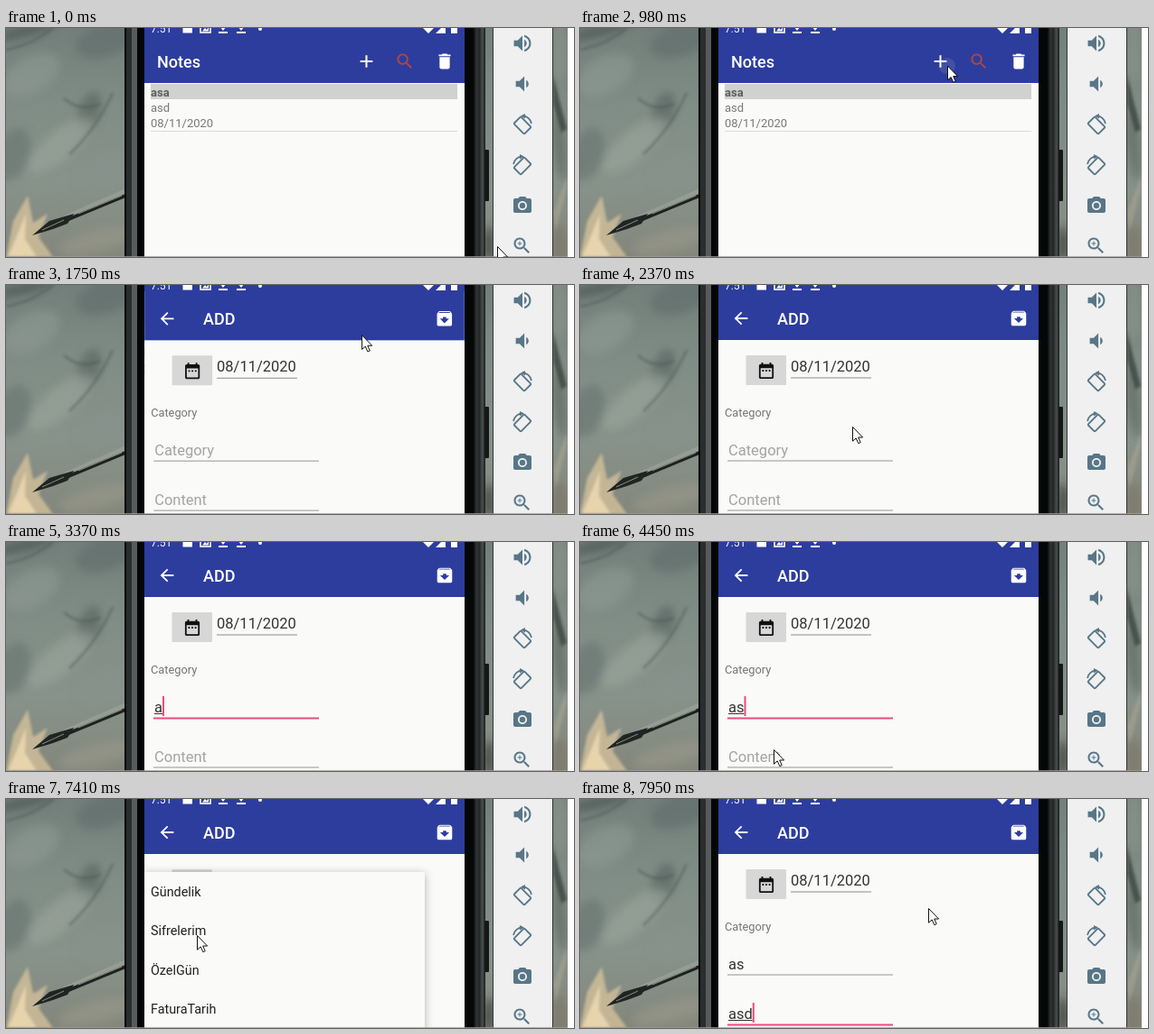
Animation of 628x254 px, one loop 8000 ms. Source, as an HTML page:

```html
<!DOCTYPE html>
<html lang="en">
<head>
<meta charset="utf-8">
<title>Notes app</title>
<style>
  html, body { margin: 0; width: 100%; height: 100%; overflow: hidden; background: #fff; }
  svg { display: block; width: 628px; height: 254px; }
  text { font-family: Roboto, Arial, sans-serif; white-space: pre; }
</style>
</head>
<body>
<svg id="stage" viewBox="0 0 628 254" xmlns="http://www.w3.org/2000/svg"></svg>
<script>
const LOOP = 8000;
const BLUE = '#2d3d9e', PAPER = '#fafaf8', PINK = '#ee4a82', SLATE = '#587688';

const ICONS = {
  volumeUp: 'M3 9v6h4l5 5V4L7 9H3zm13.5 3c0-1.77-1.02-3.29-2.5-4.03v8.05c1.48-.73 2.5-2.25 2.5-4.02zM14 3.23v2.06c2.89.86 5 3.54 5 6.71s-2.11 5.85-5 6.71v2.06c4.01-.91 7-4.49 7-8.77s-2.99-7.86-7-8.77z',
  volumeDown: 'M18.5 12c0-1.77-1.02-3.29-2.5-4.03v8.05c1.48-.73 2.5-2.25 2.5-4.02zM5 9v6h4l5 5V4L9 9H5z',
  camera: 'M9 2L7.17 4H4c-1.1 0-2 .9-2 2v12c0 1.1.9 2 2 2h16c1.1 0 2-.9 2-2V6c0-1.1-.9-2-2-2h-3.17L15 2H9zm3 15c-2.76 0-5-2.24-5-5s2.24-5 5-5 5 2.24 5 5-2.24 5-5 5zM12 8.8a3.2 3.2 0 1 0 0 6.4a3.2 3.2 0 1 0 0-6.4z',
  search: 'M15.5 14h-.79l-.28-.27C15.41 12.59 16 11.11 16 9.5 16 5.91 13.09 3 9.5 3S3 5.91 3 9.5 5.91 16 9.5 16c1.61 0 3.09-.59 4.23-1.57l.27.28v.79l5 4.99L20.49 19l-4.99-5zm-6 0C7.01 14 5 11.99 5 9.5S7.01 5 9.5 5 14 7.01 14 9.5 11.99 14 9.5 14z',
  smallPlus: 'M12 10h-2v2H9v-2H7V9h2V7h1v2h2z',
  plus: 'M19 13h-6v6h-2v-6H5v-2h6V5h2v6h6v2z',
  trash: 'M6 19c0 1.1.9 2 2 2h8c1.1 0 2-.9 2-2V7H6v12zM19 4h-3.5l-1-1h-5l-1 1H5v2h14V4z',
  archive: 'M20.54 5.23l-1.39-1.68C18.88 3.21 18.47 3 18 3H6c-.47 0-.88.21-1.16.55L3.46 5.23C3.17 5.57 3 6.02 3 6.5V19c0 1.1.9 2 2 2h14c1.1 0 2-.9 2-2V6.5c0-.48-.17-.93-.46-1.27zM12 17.5L6.5 12H10v-2h4v2h3.5L12 17.5zM5.12 5l.81-1h12l.94 1H5.12z',
  back: 'M20 11H7.83l5.59-5.59L12 4l-8 8 8 8 1.41-1.41L7.83 13H20v-2z',
  calendar: 'M9 11H7v2h2v-2zm4 0h-2v2h2v-2zm4 0h-2v2h2v-2zm2-7h-1V2h-2v2H8V2H6v2H5c-1.11 0-1.99.9-1.99 2L3 20c0 1.1.89 2 2 2h14c1.1 0 2-.9 2-2V6c0-1.1-.9-2-2-2zm0 16H5V9h14v11z',
};

// Markup helpers
const rect = (x, y, w, h, fill, more = '') =>
  `<rect x="${x}" y="${y}" width="${w}" height="${h}" fill="${fill}" ${more}/>`;
const text = (x, y, size, fill, str, more = '') =>
  `<text x="${x}" y="${y}" font-size="${size}" fill="${fill}" ${more}>${str}</text>`;
const path = (d, more) => `<path d="${d}" ${more}/>`;
const icon = (name, cx, cy, scale, fill) =>
  path(ICONS[name], `fill="${fill}" fill-rule="evenodd" transform="translate(${cx} ${cy}) scale(${scale}) translate(-12 -12)"`);
const blob = (cx, cy, rx, ry, fill, opacity, turn = 0) =>
  `<ellipse cx="${cx}" cy="${cy}" rx="${rx}" ry="${ry}" fill="${fill}" opacity="${opacity}" transform="rotate(${turn} ${cx} ${cy})"/>`;
const gradient = (id, vertical, colors) =>
  `<linearGradient id="${id}" x2="${vertical ? 0 : 1}" y2="${vertical ? 1 : 0}">${colors.map((c, i) =>
    `<stop offset="${i / (colors.length - 1)}" stop-color="${c}"/>`).join('')}</linearGradient>`;

const rotateIcon = (cy, flip) => `
  <g transform="translate(571 ${cy}) scale(${flip} 1)" fill="none" stroke="${SLATE}" stroke-width="1.9">
    <rect x="-5.5" y="-8.2" width="11" height="16.4" rx="1.2" transform="translate(0 1) rotate(-45)"/>
    <path d="M0 -9.6Q8 -9 10 -1" stroke-width="1.8"/>
    <path d="M-2 -9.6L3 -12V-6.5Z" fill="${SLATE}" stroke="none"/>
  </g>`;

const wallpaper = `
  ${rect(0, 0, 621, 254, 'url(#stone)')}
  <g filter="url(#soft)">
    ${blob(20, 4, 34, 6, '#4b5653', .7, -14)}
    ${blob(110, 14, 34, 18, '#606d69', .6, -18)}
    ${blob(28, 52, 34, 20, '#929d96', .5, -30)}
    ${blob(92, 92, 12, 22, '#56625e', .6, 20)}
    ${blob(60, 130, 44, 16, '#9ca69d', .6, -40)}
    ${blob(8, 140, 18, 30, '#66736e', .6, 18)}
    ${blob(105, 160, 28, 18, '#87938c', .6, -30)}
    ${blob(100, 236, 42, 12, '#9a988a', .6, -14)}
    ${blob(534, 110, 5, 70, '#7d8984', .7)}
    ${blob(534, 240, 5, 20, '#33393a', .8)}
    ${blob(612, 20, 9, 40, '#8a948b', .7)}
    ${blob(612, 130, 7, 40, '#626a63', .7, -6)}
    ${blob(612, 240, 9, 22, '#7d776a', .7)}
  </g>
  <g filter="url(#brush)">
    ${path('M0 254L8 214L24 186L30 216L46 206L36 232L52 254Z', 'fill="#d9c49c" opacity=".75"')}
    ${path('M2 254L14 226L22 206L21 234L34 254Z', 'fill="#f0dcb4" opacity=".8"')}
    ${path('M605 52L620 112L614 116L605 84Z', 'fill="#3b423f" opacity=".75"')}
    ${path('M605 205L620 165V178L608 225Z', 'fill="#aaa38f" opacity=".6"')}
    ${path('M0 24Q30 18 52 0M64 78Q82 94 104 84M70 140Q100 112 118 72', 'fill="none" stroke="#4a5552" stroke-width="2.5" opacity=".5"')}
  </g>
  ${path('M132 182L64 212', 'stroke="#a9aea3" stroke-width="7" opacity=".45"')}
  ${path('M132 186L62 215', 'stroke="#1d2120" stroke-width="4"')}
  ${path('M29 230L48 214L75 206L68 217L52 223Z', 'fill="#202423"')}
  ${path('M40 224L64 213M80 206L128 186', 'stroke="#8b8d82" stroke-width="1"')}
  ${rect(621, 0, 7, 254, '#fff')}`;

const phone = `
  ${rect(131, 0, 399, 254, '#050606')}
  ${rect(133, 0, 6, 254, '#2a2d2d')}
  ${rect(139, 0, 6, 254, '#575b5b')}
  ${rect(517, 0, 13, 254, 'url(#edgeRight)')}
  ${rect(529, 135, 5, 57, '#151717', 'rx="1"')}
  ${rect(538, 0, 1, 254, '#303535')}`;

const toolbar = `
  ${rect(539, 0, 65, 254, '#f0f0f0')}
  ${rect(604, 0, 1, 254, '#30302e')}
  ${icon('volumeUp', 571, 17, 1.05, SLATE)}
  ${icon('volumeDown', 571, 62, 1.05, SLATE)}
  ${rotateIcon(107, 1)}${rotateIcon(152, -1)}
  ${icon('camera', 571, 197, 1, SLATE)}
  ${icon('search', 570.5, 241.5, 1, SLATE)}${icon('smallPlus', 570.5, 241.5, 1, SLATE)}`;

const download = x => path(`M${x - 3.5} -3L${x} 1.5L${x + 3.5} -3M${x - 5} 5h10`, 'fill="none" stroke="#fff" stroke-width="1.8"');
const statusBar = `
  ${rect(153, 0, 354, 7, BLUE)}
  ${text(160, 5, 12, '#fff', '7:51')}
  ${rect(195.5, -5, 10.5, 10.5, '#fff')}
  ${rect(215, -5, 11, 10, 'none', 'stroke="#fff" stroke-width="1.6"')}
  ${path('M217 3.5L220 0L222 2L224 -1V3.5Z', 'fill="#fff"')}
  ${download(240)}${download(260)}
  <circle cx="281" cy="1" r="2" fill="#fff"/>
  ${path('M461 0H473L467 6ZM475 6L486 -5V6Z', 'fill="#fff"')}
  ${rect(492, -5, 7, 11, '#fff')}`;

const listScreen = `
  ${rect(153, 0, 354, 300, PAPER)}
  ${rect(153, 0, 354, 61, BLUE)}
  <circle id="ripple" fill="#fff" opacity=".1"/>
  ${text(167, 44, 18, '#fff', 'Notes', 'font-weight="500"')}
  ${icon('plus', 398.5, 37, .98, '#fff')}
  ${icon('search', 441, 37, .95, '#b2473f')}
  ${icon('trash', 485, 37, .94, '#fff')}
  ${rect(160, 62, 339, 17, '#d0d2d0')}
  ${text(160, 76, 13, '#5c5f5c', 'asa', 'font-weight="700"')}
  ${text(160, 93, 13, '#777a77', 'asd')}
  ${text(160, 110, 13, '#777a77', '08/11/2020')}
  ${rect(160, 114, 339, 1, '#dadbd9')}`;

const field = id => `
  <text id="${id}Text" x="164" font-size="16.5"></text>
  <rect id="${id}Line" x="163" width="183"/>
  <rect id="${id}Compose" x="164" height="1" fill="#333"/>
  <rect id="${id}Caret" width="2" height="22" fill="${PINK}"/>`;

const addScreen = `
  ${rect(153, 0, 354, 300, PAPER)}
  ${rect(153, -60, 354, 121, BLUE)}
  ${icon('back', 178, 37, .92, '#fff')}
  ${text(218, 44, 18, '#fff', 'ADD', 'font-weight="500"')}
  ${icon('archive', 485, 37, .92, '#fff')}
  ${rect(183.5, 78, 44.5, 33, '#d6d7d6', 'rx="1"')}
  ${icon('calendar', 206, 95, .9, '#111')}
  ${text(233, 96, 16.5, '#333', '08/11/2020')}
  ${rect(233, 102.5, 89, 1, '#8d8d8d')}
  ${text(160, 145.5, 12.8, '#747674', 'Category')}
  ${field('category')}${field('content')}`;

const popup = `
  <rect id="popupBox" height="220" fill="${PAPER}" filter="url(#shadow)"/>
  <rect id="itemPress" x="153" y="125" width="310" height="43" fill="#000"/>
  <g id="popupItems">${['Gündelik', 'Sifrelerim', 'ÖzelGün', 'FaturaTarih'].map((name, i) =>
    text(160, 108 + i * 43.3, 14.35, '#202020', name)).join('')}</g>`;

document.getElementById('stage').innerHTML = `
  <defs>
    ${gradient('stone', true, ['#727f7a', '#808d86', '#87938b', '#84877c'])}
    ${gradient('edgeRight', false, ['#0c0d0d', '#303434', '#242727', '#4a4f4f', '#191b1b'])}
    <filter id="soft"><feGaussianBlur stdDeviation="5"/></filter>
    <filter id="brush"><feGaussianBlur stdDeviation="1.5"/></filter>
    <filter id="shadow"><feDropShadow dx="0" dy="2" stdDeviation="5" flood-opacity=".3"/></filter>
    <clipPath id="screenClip">${rect(153, 0, 354, 254, '#000')}</clipPath>
  </defs>
  ${wallpaper}${phone}${toolbar}
  <g clip-path="url(#screenClip)">
    <g id="list">${listScreen}</g>
    <g id="add">${addScreen}</g>
    <g id="popup">${popup}</g>
    ${statusBar}
  </g>
  ${rect(0, 253, 621, 1, '#a09a98', 'opacity=".75"')}
  <g id="cursor">${path('M.5 .5V16.2L4.2 12.9L6.8 18.7L9.2 17.6L6.7 12H11.6Z', 'fill="#fff" stroke="#111" stroke-width="1"')}</g>`;

const el = {};
document.querySelectorAll('svg [id]').forEach(node => { el[node.id] = node; });
const set = (id, attrs) => {
  for (const key in attrs) el[id].setAttribute(key, attrs[key]);
};
const show = (id, on) => set(id, { display: on ? 'inline' : 'none' });

const progress = (t, from, to) => Math.min(1, Math.max(0, (t - from) / (to - from)));
const mix = (a, b, p) => a + (b - a) * p;
const smooth = p => p * p * (3 - 2 * p);
const zoom = (s, cx, cy) => `translate(${cx} ${cy}) scale(${s}) translate(${-cx} ${-cy})`;

// Each stretch of visible pointer movement: [time, x, y]
const POINTER = [
  [[0, 543, 242], [70, 543, 242], [660, 406, 42], [1370, 406, 41], [1600, 406, 41], [2290, 301, 157],
   [2370, 301, 157], [2600, 219, 182], [3140, 219, 182]],
  [[3690, 219, 184], [4380, 214, 230], [4950, 214, 230], [5150, 220, 258]],
  [[6480, 219, 232], [6870, 192, 181], [7100, 192, 181], [7410, 211, 151], [7600, 211, 151],
   [7950, 385, 121], [LOOP, 385, 121]],
];

function drawPointer(t) {
  const run = POINTER.find(r => t >= r[0][0] && t < r[r.length - 1][0]);
  show('cursor', run);
  if (!run) return;
  const i = run.findIndex(k => k[0] > t);
  const [a, b] = [run[i - 1], run[i]];
  const p = smooth(progress(t, a[0], b[0]));
  set('cursor', { transform: `translate(${mix(a[1], b[1], p)} ${mix(a[2], b[2], p)})` });
}

// Typed letters appear at the given times; the field has focus from start to end.
function drawField(id, t, { hint, word, times, start, end, lineY }) {
  const count = times.filter(at => t >= at).length;
  const focused = t >= start && t < end;
  const label = el[id + 'Text'];
  label.textContent = count ? word.slice(0, count) : hint;
  set(id + 'Text', { y: lineY - 6, fill: count ? '#333' : '#a3a5a3' });
  set(id + 'Line', { y: lineY - .5, height: focused ? 2 : 1, fill: focused ? PINK : '#969896' });
  const width = count ? label.getComputedTextLength() : 0;
  show(id + 'Compose', focused && count);
  set(id + 'Compose', { y: lineY - 5, width });
  show(id + 'Caret', focused);
  set(id + 'Caret', { x: 164 + width, y: lineY - 24 });
}

function drawRipple(t) {
  show('ripple', t >= 980);
  const p = progress(t, 1060, 1370);
  set('ripple', {
    cx: mix(406, 398.5, p), cy: mix(42, 36.5, p),
    r: mix(mix(9, 15, progress(t, 980, 1060)), 18.5, p),
  });
}

function drawScreens(t) {
  const p = progress(t, 1470, 1820);
  const e = 1 - (1 - p) ** 3;
  set('list', { transform: zoom(mix(1, 1.054, e), 330, 360) });
  show('list', p < 1);
  set('add', { transform: zoom(mix(.85, 1, e), 330, 345), opacity: Math.min(1, p / .43) });
  show('add', p > 0);
}

function drawPopup(t) {
  show('popup', t >= 5870 && t < 7950);
  const rest = 1 - progress(t, 5870, 6020);
  const x = 150 + 5 * rest;
  set('popupBox', { x, y: 81 + 26 * rest, width: 463 + 3 * rest - x });
  set('popupItems', { transform: `translate(${2 * rest} ${15 * rest})` });
  set('itemPress', { opacity: .09 * progress(t, 7500, 7640) });
  set('popup', { opacity: 1 - progress(t, 7720, 7950) });
}

function draw(t) {
  drawRipple(t);
  drawScreens(t);
  drawField('category', t, { hint: 'Category', word: 'as', times: [3140, 3440], start: 2830, end: 4530, lineY: 195 });
  drawField('content', t, { hint: 'Content', word: 'asd', times: [4690, 4840, 5000], start: 4530, end: LOOP, lineY: 250 });
  drawPopup(t);
  drawPointer(t);
}

const began = performance.now();
function tick() {
  draw((performance.now() - began) % LOOP);
  requestAnimationFrame(tick);
}
tick();
</script>
</body>
</html>
```
